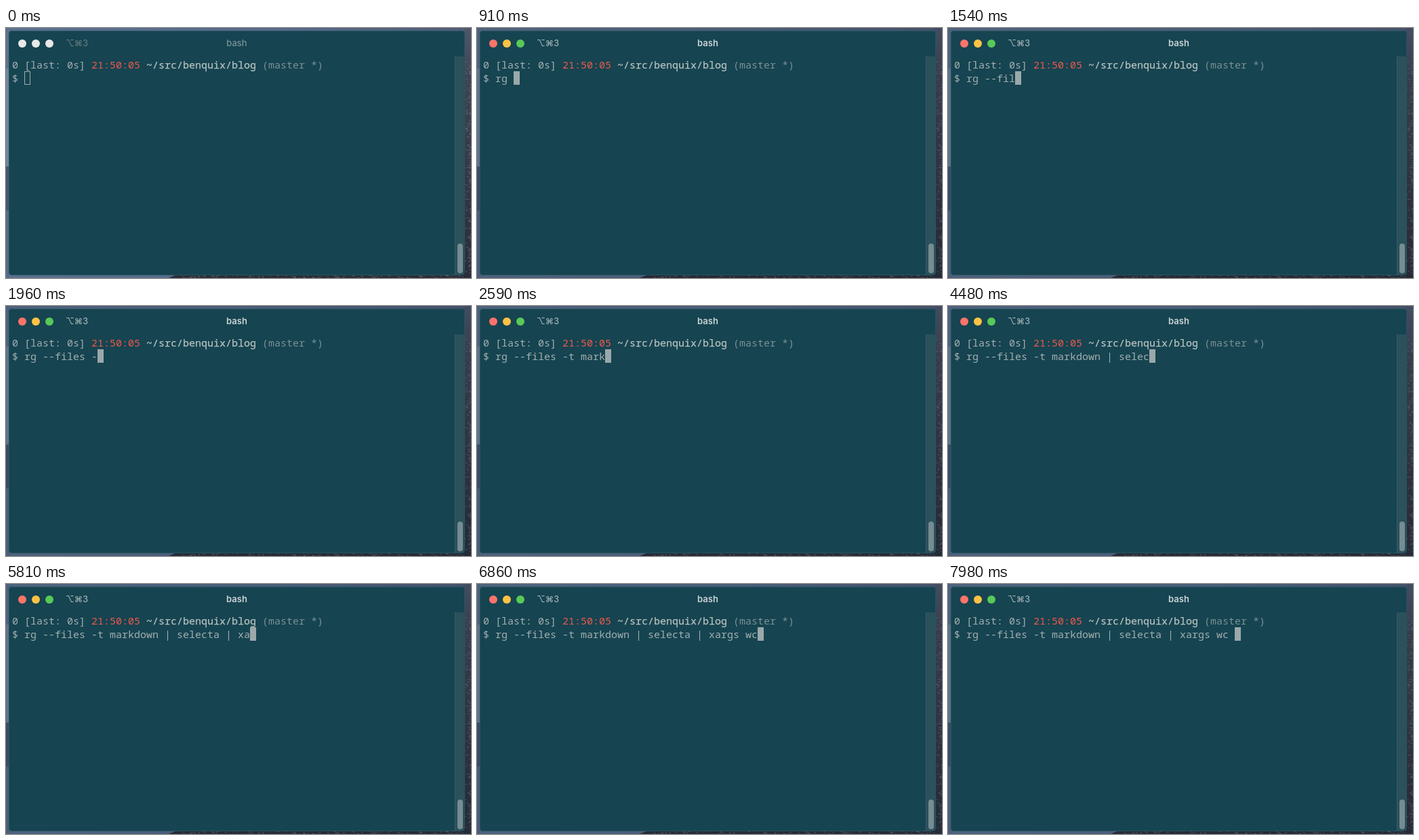
Write an HTML page that moves like this. It is 686 by 370 pixels and loops after 8000 ms.

```html
<!DOCTYPE html>
<html lang="en">
<head>
<meta charset="utf-8">
<title>Terminal</title>
<style>
  html, body { margin: 0; width: 100%; height: 100%; overflow: hidden; background: #2a3044; }
  svg { display: block; width: 686px; height: 370px; }
  .mono { font: 500 15px "Noto Sans Mono", "DejaVu Sans Mono", monospace; fill: #a3afaf; white-space: pre; }
  .time { fill: #ee584a; }
  .path { fill: #b8c2bf; stroke: #b8c2bf; stroke-width: .25px; }
  .branch { fill: #7b9093; }
  .ui { font: 600 13px Inter, "DejaVu Sans", sans-serif; fill: #ccd5d7; }
  .key { font-size: 12.5px; font-weight: 500; fill: #9fb0b4; }
  .cursor { fill: #9aa8aa; }
  .idle .ui { font-weight: 500; fill: #7c9298; }
  .idle .key { fill: #62797f; }
  .idle .light { fill: #e8e8e8; }
  .idle .cursor { fill: none; stroke: #a0adad; }
  .idle .shade { opacity: 0; }
</style>
</head>
<body>
<svg id="stage" class="idle" viewBox="0 0 686 370">
  <defs>
    <linearGradient id="sky">
      <stop offset="0" stop-color="#5a718f"/>
      <stop offset=".6" stop-color="#546a89"/>
      <stop offset="1" stop-color="#4e5c76"/>
    </linearGradient>
    <linearGradient id="rock" x2="0" y2="1">
      <stop offset="0" stop-color="#4d586d"/>
      <stop offset=".2" stop-color="#3e4352"/>
      <stop offset="1" stop-color="#2a2d39"/>
    </linearGradient>
  </defs>

  <rect width="686" height="370" fill="url(#sky)"/>
  <rect y="60" width="5" height="145" fill="#6f869d"/>
  <rect y="205" width="5" height="65" fill="#435671"/>
  <rect y="270" width="5" height="100" fill="#566c88"/>
  <path d="M676 0H686V370H240L252 365H676Z" fill="url(#rock)"/>
  <path id="grain" fill="none" stroke="#737a89" stroke-opacity=".6"/>
  <rect class="shade" width="686" height="370" fill="#141c30" opacity=".18"/>

  <rect x="4" y="4" width="673" height="362" rx="5" fill="#0f343f"/>
  <rect x="4.5" y="4.5" width="672" height="361" rx="5" fill="#164451" stroke="#285460"/>
  <rect x="662" y="42" width="14" height="323" fill="#2b515b"/>
  <path d="M662.5 42V365" stroke="#385c65"/>
  <rect x="666" y="319" width="8" height="44" rx="4" fill="#768c92"/>

  <circle class="light" cx="24" cy="23" r="6" fill="#fc7469"/>
  <circle class="light" cx="44" cy="23" r="6" fill="#fdc344"/>
  <circle class="light" cx="64" cy="23" r="6" fill="#58c957"/>
  <text class="ui key" x="88" y="27">⌥⌘3</text>
  <text class="ui" x="340.5" y="27" text-anchor="middle">bash</text>

  <text class="mono" x="9" y="60">0 [last: 0s] <tspan class="time">21:50:05</tspan> <tspan class="path">~/src/benquix/blog</tspan> <tspan class="branch">(master *)</tspan></text>
  <text class="mono" x="9" y="80">$ <tspan id="typed"></tspan></text>
  <rect id="cursor" class="cursor"/>
</svg>
<script>
const LOOP = 8000, CELL = 9, START = 27;
const FOCUS = 70, ERASE = 7630;
const COMMAND = 'rg --files -t markdown | selecta | xargs wc -';
// When each key is struck, in ms.
const KEYS = [
  560, 770, 910,
  1050, 1190, 1330, 1400, 1470, 1610, 1680, 1820,
  1960, 2100, 2240,
  2310, 2380, 2450, 2590, 2660, 2730, 2800, 2870, 2940,
  3220, 3430,
  3990, 4130, 4200, 4340, 4480, 4690, 4830, 5040,
  5180, 5390,
  5600, 5810, 5880, 5950, 6020, 6160,
  6440, 6860, 7000, 7350
];

const $ = id => document.getElementById(id);
const stage = $('stage'), typed = $('typed'), cursor = $('cursor');

function drawGrain() {
  let seed = 7, d = '';
  const rand = () => (seed = seed * 16807 % 2147483647) / 2147483647;
  const fleck = (x, y) => {
    d += `M${x.toFixed(1)} ${y.toFixed(1)}l${(1 + rand() * 3).toFixed(1)} ${(rand() * 3 - 1).toFixed(1)}`;
  };
  for (let i = 0; i < 150; i++) fleck(677 + rand() * 8, 50 + rand() * 320);
  for (let i = 0; i < 90; i++) fleck(255 + rand() * 425, 366.5 + rand() * 3);
  $('grain').setAttribute('d', d);
}

function place(x, y, width, height) {
  for (const [name, value] of Object.entries({ x, y, width, height })) {
    cursor.setAttribute(name, value);
  }
}

function render(t) {
  const idle = t < FOCUS;
  const count = KEYS.filter(k => k <= t).length - (t >= ERASE ? 1 : 0);
  const x = START + count * CELL;
  stage.classList.toggle('idle', idle);
  typed.textContent = COMMAND.slice(0, count);
  if (idle) place(x + .5, 64.5, CELL - 1, 19);
  else place(x, 64, CELL, 20);
}

drawGrain();
const begin = performance.now();
function tick() {
  render((performance.now() - begin) % LOOP);
  requestAnimationFrame(tick);
}
tick();
</script>
</body>
</html>
```
